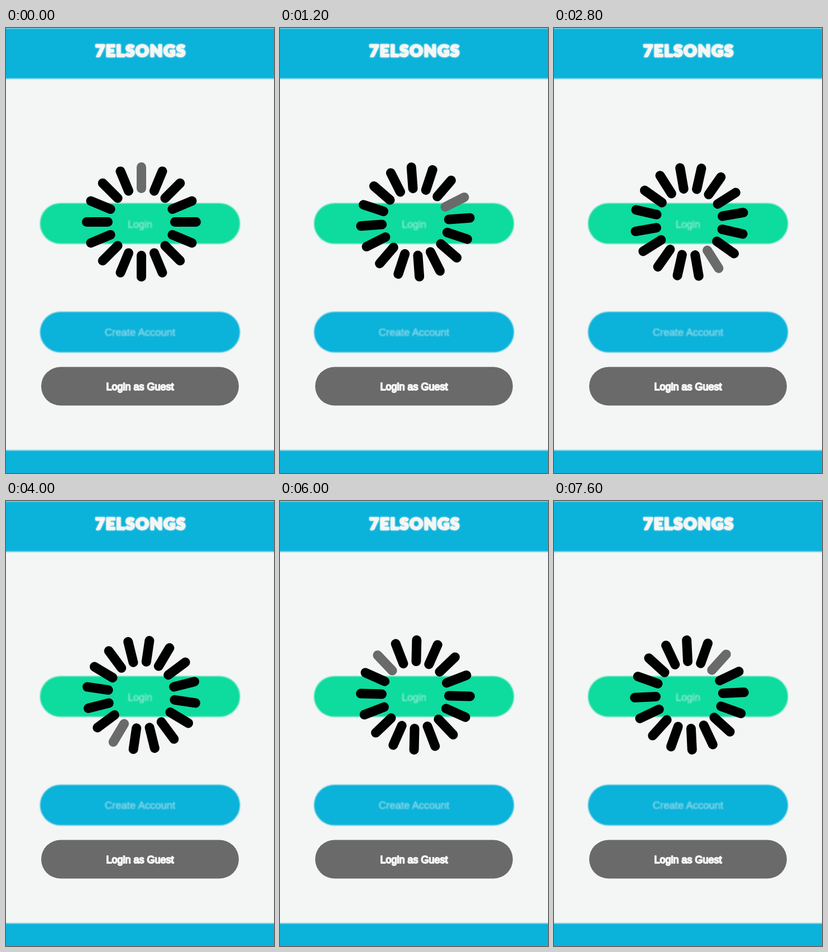
An HTML page for the animation above (8000 ms loop, 480 by 795 pixels).

```html
<!DOCTYPE html>
<html lang="en">
<head>
<meta charset="utf-8">
<title>Login</title>
<style>
  html, body { margin: 0; height: 100%; overflow: hidden; background: #f4f6f5; }
  svg { display: block; width: 480px; height: 795px; }
  text { font: 18px "Liberation Sans", Arial, sans-serif; fill: #fff; text-anchor: middle; }
  .brand { font: 900 29px Lato, sans-serif; fill: #f4f6f5; stroke: #f4f6f5; stroke-width: 2.5px;
           stroke-linejoin: round; letter-spacing: 1.9px; filter: drop-shadow(0 0 1.5px #f4f6f5); }
  .soft { fill: #f4f6f5; stroke: #f4f6f5; stroke-width: .6px; opacity: .55; filter: blur(1px); }
  .bold { fill: #f4f6f5; stroke: #f4f6f5; stroke-width: 2px; stroke-linejoin: round; }
  .panels { filter: blur(.8px); }
  #spinner line { stroke: #000; stroke-width: 17; stroke-linecap: round; }
  #spinner line:first-child { stroke: #6a6a6a; }
</style>
</head>
<body>
<svg viewBox="0 0 480 795">
  <g class="panels" fill="#0bb2da">
    <rect x="-10" y=".5" width="500" height="90"/>
    <rect x="-10" y="754.5" width="500" height="50"/>
    <rect x="61" y="507" width="358" height="72.5" rx="36"/>
    <rect x="61" y="313" width="358" height="72.5" rx="36" fill="#0edb9e"/>
  </g>
  <rect x="63" y="605.5" width="354" height="69" rx="34.5" fill="#6a6a6a"/>
  <text class="brand" x="241.5" y="51">7ELSONGS</text>
  <text class="soft" x="240" y="356.5">Login</text>
  <text class="soft" x="240" y="550" style="font-size:18.5px">Create Account</text>
  <text class="bold" x="240" y="647">Login as Guest</text>
  <g id="spinner"></g>
</svg>
<script>
  const LOOP = 8000, STEP = 400, SPOKES = 16, POSES = 17;
  const gap = 360 / SPOKES;
  const turn = gap * (SPOKES - 1) / (POSES - 1);
  const spinner = document.getElementById("spinner");

  spinner.innerHTML = Array.from({ length: SPOKES }, (_, i) =>
    `<line y1="-60" y2="-98" transform="rotate(${i * gap})"/>`).join("");

  function draw(now) {
    const pose = Math.floor(now % LOOP / STEP) % POSES;
    spinner.setAttribute("transform", `translate(242.5 346.5) rotate(${pose * turn})`);
    requestAnimationFrame(draw);
  }
  draw(performance.now());
</script>
</body>
</html>
```
